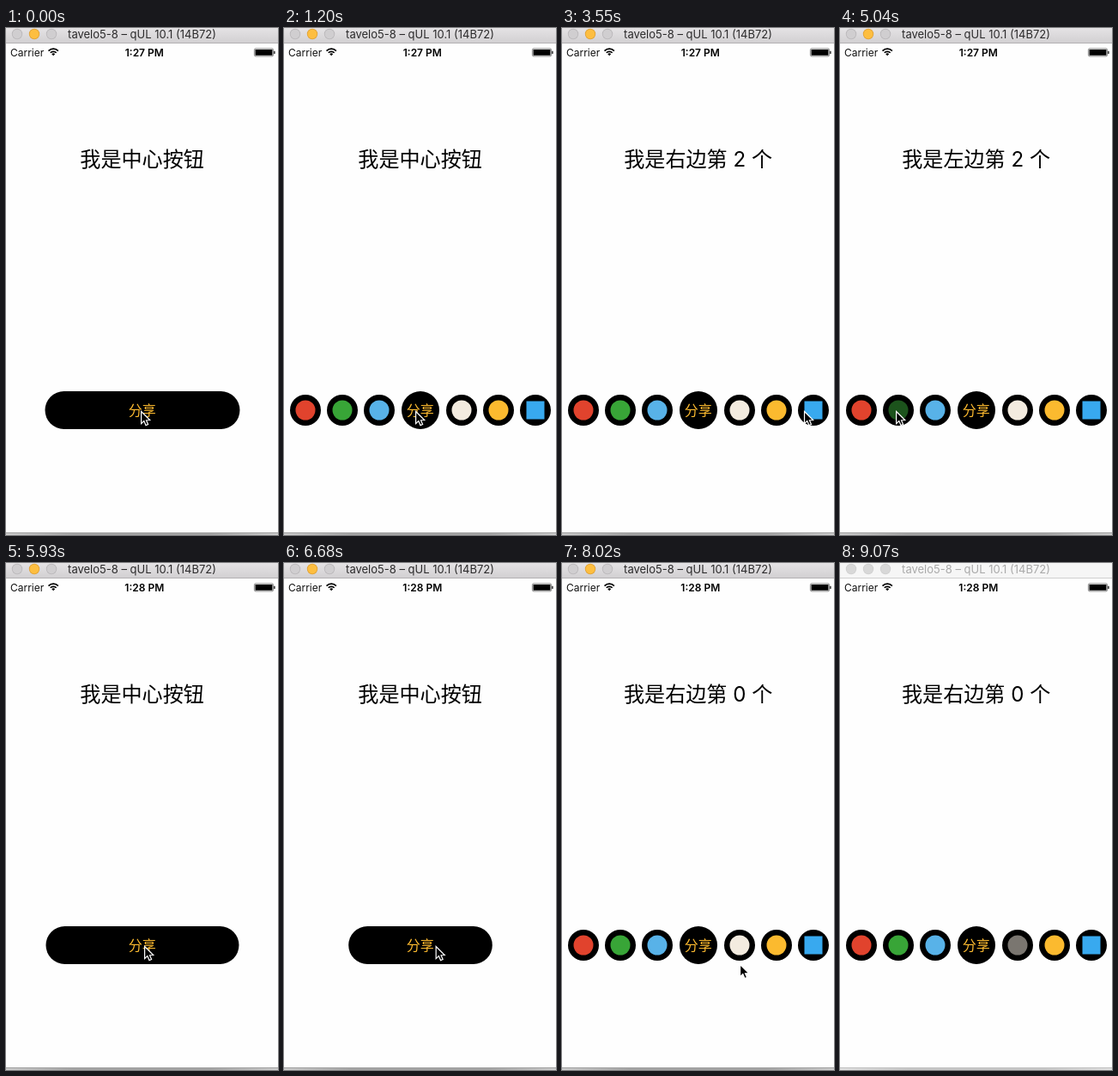
Write an HTML page with a canvas that moves like this. It is 317x589 px and loops after 9170 ms.

```html
<!DOCTYPE html>
<html lang="zh-CN">
<head>
<meta charset="utf-8">
<title>Share button</title>
<style>
  html, body { margin: 0; width: 100%; height: 100%; overflow: hidden; background: #fefefe; }
  canvas { display: block; width: 317px; height: 589px; }
</style>
</head>
<body>
<canvas id="stage"></canvas>
<script>
const W = 317, H = 589, LOOP = 9170;
const FIRST = 600, STEP = 148, SLACK = 12;
const OPEN = 540, CLOSE = 5440, REOPEN = 6470, EXIT = 7900, INACTIVE = 9060;
const MID = 159, ROW = 444, PRESS = 150;
const LATIN = 'Inter, "Noto Sans CJK SC", "Noto Sans CJK", sans-serif';

const canvas = document.getElementById('stage');
const ctx = canvas.getContext('2d');
const dpr = window.devicePixelRatio || 1;
canvas.width = W * dpr;
canvas.height = H * dpr;

// Icon colours by slot: negative is left of the button, positive is right
const colors = {
  '-3': '#e1432d', '-2': '#38a537', '-1': '#58b2e8',
  1: '#f3ebdf', 2: '#fbba2f', 3: '#38a9ef'
};

// Pointer stops: time, x
const stops = [
  [0, 157], [1350, 153], [1780, 200], [2660, 246], [3400, 288],
  [4580, 108], [5180, 65], [5480, 161], [6400, 161], [7410, 198]
];

const clamp = v => Math.max(0, Math.min(1, v));
const lerp = (a, b, p) => a + (b - a) * p;
const part = (t, from, to) => clamp((t - from) / (to - from));
const smooth = p => p * p * (3 - 2 * p);
const easeOut = p => 1 - (1 - p) ** 3;

const slotX = slot => MID + Math.sign(slot) * 5 + slot * 43;
const slotAt = x => Math.round((x + 4 - MID) / 46);

// The screen updates in even steps
const poseTime = t => Math.max(0, FIRST + Math.floor((t - FIRST + SLACK) / STEP) * STEP);

function messageFor(slot) {
  if (!slot) return '我是中心按钮';
  return slot > 0 ? `我是右边第 ${slot - 1} 个` : `我是左边第 ${slot + 3} 个`;
}

function stateAt(t) {
  const i = stops.findLastIndex(s => s[0] <= t);
  const [time, x] = stops[i];
  const [nextTime, nextX] = stops[i + 1] || [LOOP, x];
  const glide = easeOut(part(t, time + PRESS, nextTime - PRESS));
  const exit = part(t, EXIT, 8590);
  const opened = start => smooth(part(t, start, start + 520));
  return {
    message: messageFor(slotAt(x)),
    pressed: t >= nextTime - PRESS ? slotAt(nextX) : 0,
    spread: opened(OPEN) - opened(CLOSE) + opened(REOPEN),
    pointer: [lerp(x, nextX, glide) + 62 * exit, ROW + 0.6 + 145 * exit],
    clock: t < CLOSE ? '1:27 PM' : '1:28 PM'
  };
}

function text(str, x, y, font, color, align = 'center') {
  ctx.font = font + ' ' + LATIN;
  ctx.fillStyle = color;
  ctx.textAlign = align;
  ctx.fillText(str, x, y);
}

function rect(x, y, w, h, fill) {
  ctx.fillStyle = fill;
  ctx.fillRect(x, y, w, h);
}

function disc(x, y, r, color) {
  ctx.fillStyle = color;
  ctx.beginPath();
  ctx.arc(x, y, r, 0, Math.PI * 2);
  ctx.fill();
}

function fade(x1, y1, ...shades) {
  const g = ctx.createLinearGradient(0, 0, x1, y1);
  shades.forEach((c, i) => g.addColorStop(i / (shades.length - 1), c));
  return g;
}

function drawWindow(active) {
  rect(0, 0, W, H, '#fefefe');
  rect(0, 0, W, 17, active ? fade(0, 17, '#e5e3e5', '#d2d0d2') : '#f6f6f6');
  rect(0, 17, W, 1, active ? '#b3b1b3' : '#d0d0d0');

  for (let i = 0; i < 3; i++) {
    const x = 13 + i * 20;
    const lit = active && i === 1;
    disc(x, 7, 6.2, lit ? '#dfa034' : active ? '#b9b7b9' : '#cfcfcf');
    disc(x, 7, 5.4, lit ? '#fdbe40' : active ? '#d0ced0' : '#d8d8d8');
  }
  text('tavelo5-8 – qUL 10.1 (14B72)', 158.5, 12, '13px', active ? '#2b2a2b' : '#a9a9a9');

  rect(0, 586, W, 1, active ? '#9a9a9a' : '#bcbcbc');
  const [edge, core] = active ? ['#cecece', '#a4a4a4'] : ['#e2e2e2', '#c8c8c8'];
  rect(0, 587, W, 2, fade(W, 0, edge, core, core, core, edge));
}

function drawStatus(clock) {
  text('Carrier', 5, 32.5, '12px', '#111', 'left');
  text(clock, 161.3, 32.5, '600 12px', '#000');

  const fan = r => ctx.arc(55.2, 32.2, r, -Math.PI * 0.75, -Math.PI * 0.25);
  ctx.strokeStyle = '#000';
  ctx.lineWidth = 1.7;
  for (const r of [8, 4.9]) {
    ctx.beginPath();
    fan(r);
    ctx.stroke();
  }
  ctx.fillStyle = '#000';
  ctx.beginPath();
  ctx.moveTo(55.2, 32.2);
  fan(2.8);
  ctx.fill();

  ctx.lineWidth = 0.7;
  ctx.strokeStyle = '#555';
  ctx.beginPath();
  ctx.roundRect(289.4, 23.9, 22.2, 9, 1.6);
  ctx.stroke();
  rect(290.5, 25, 20, 6.8, '#000');
  rect(312.3, 26.8, 1.2, 3.2, '#000');
}

function drawIcon(slot, spread, pressed) {
  const x = lerp(MID, slotX(slot), spread);
  disc(x, ROW, 18, '#000');
  ctx.globalAlpha = pressed ? 0.5 : 1;
  if (slot === 3) rect(x - 10.5, ROW - 10.5, 21, 21, colors[slot]);
  else disc(x, ROW, 11.5, colors[slot]);
  ctx.globalAlpha = 1;
}

function drawButton(spread) {
  const half = lerp(113.5, 22, spread);
  ctx.fillStyle = '#000';
  ctx.beginPath();
  ctx.roundRect(MID - half, ROW - 22, half * 2, 44, 22);
  ctx.fill();
  text('分享', 158.8, 449.6, '16px', '#fbb92f');
}

function drawPointer([x, y]) {
  ctx.save();
  ctx.translate(x, y);
  const arrow = new Path2D('M.6 .9V15l3.2-3 2.2 5 2.6-1.1-2.1-4.8 4.2-.2z');
  ctx.fillStyle = '#000';
  ctx.fill(arrow);
  ctx.strokeStyle = '#fff';
  ctx.lineWidth = 1.2;
  ctx.stroke(arrow);
  ctx.restore();
}

function draw(now) {
  const active = now < INACTIVE;
  const { message, pressed, spread, pointer, clock } = stateAt(poseTime(now));

  ctx.setTransform(dpr, 0, 0, dpr, 0, 0);
  drawWindow(active);
  drawStatus(clock);
  text(message, 158.6, 161, '24.1px', '#000');
  for (let slot = -3; slot <= 3; slot++) {
    if (slot) drawIcon(slot, spread, slot === pressed);
  }
  drawButton(spread);
  if (active) drawPointer(pointer);
}

const origin = performance.now();
function tick() {
  draw((performance.now() - origin) % LOOP);
  requestAnimationFrame(tick);
}
tick();
</script>
</body>
</html>
```
